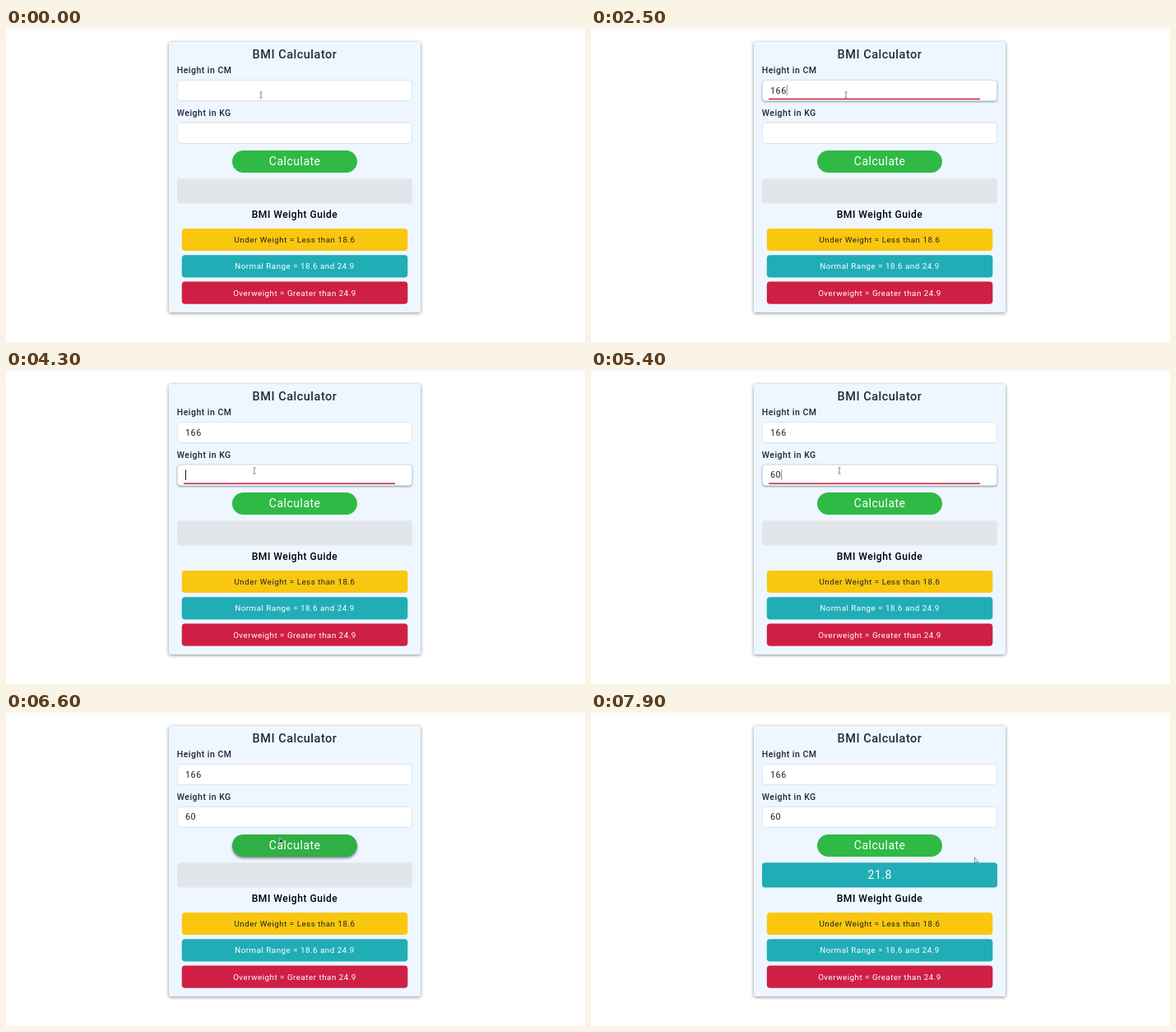
These frames come from a looping animation (704x382 px, 8000 ms). An HTML page:

```html
<!DOCTYPE html>
<html lang="en">
<head>
<meta charset="utf-8">
<title>BMI Calculator</title>
<style>
  html, body { margin: 0; width: 100%; height: 100%; overflow: hidden; background: #fff; }
  svg { display: block; width: 704px; height: 382px; }
  text { font: 400 9.8px Roboto, sans-serif; letter-spacing: .5px; fill: #fff; }
  .mid { text-anchor: middle; }
  .label { font-size: 10.5px; font-weight: 500; fill: #20262e; }
  .value { font-size: 10.8px; fill: #222; }
  .big { font-size: 14px; }
  .field { fill: #fff; stroke: #d5dce4; stroke-width: .8; }
  .focus .field { filter: drop-shadow(0 1.5px 1.2px rgba(0, 0, 0, .4)); }
  .line { fill: #cb1d45; visibility: hidden; }
  .focus .line { visibility: visible; }
  #card { fill: #eef6ff; filter: drop-shadow(0 1.5px 2px rgba(0, 0, 0, .45)); }
</style>
</head>
<body>
<svg viewBox="0 0 704 382">
  <defs>
    <linearGradient id="top" x2="0" y2="1">
      <stop stop-color="#fafafa"/><stop offset="1" stop-color="#fff"/>
    </linearGradient>
  </defs>
  <rect width="704" height="9" fill="url(#top)"/>
  <rect id="card" x="198" y="17" width="306" height="329" rx="2"/>
  <text class="mid" x="351" y="36.7" style="font-size:14.5px;font-weight:500;fill:#262c38">BMI Calculator</text>

  <g id="height">
    <text class="label" x="207.7" y="55">Height in CM</text>
    <rect class="field" x="208.4" y="63.4" width="285.2" height="25.2" rx="4"/>
    <rect class="line" x="216" y="85.7" width="257" height="1.5"/>
    <text class="value" x="218" y="79.5"></text>
    <rect class="caret" y="69.5" width="1" height="12.5" fill="#111"/>
  </g>
  <g id="weight">
    <text class="label" x="207.7" y="107">Weight in KG</text>
    <rect class="field" x="208.4" y="115.2" width="285.2" height="25.2" rx="4"/>
    <rect class="line" x="216" y="137.4" width="257" height="1.5"/>
    <text class="value" x="218" y="131.3"></text>
    <rect class="caret" y="121.3" width="1" height="12.5" fill="#111"/>
  </g>

  <rect id="button" x="275" y="149" width="152" height="27" rx="13.5"/>
  <text class="mid big" x="351.2" y="167">Calculate</text>
  <rect id="result" x="208" y="183.3" width="286" height="30.2" rx="3.5"/>
  <text id="bmi" class="mid big" x="351.2" y="203.3"></text>

  <text class="mid" x="351" y="230.7" style="font-size:12.1px;font-weight:500;fill:#000">BMI Weight Guide</text>
  <rect x="213.8" y="244" width="274.6" height="27" rx="4" fill="#f9c70f"/>
  <text class="mid" x="351" y="261" style="fill:#222">Under Weight = Less than 18.6</text>
  <rect x="213.8" y="276.2" width="274.6" height="27.4" rx="4" fill="#21adb6"/>
  <text class="mid" x="351" y="293.4">Normal Range = 18.6 and 24.9</text>
  <rect x="213.8" y="308.6" width="274.6" height="27.2" rx="4" fill="#cf1f45"/>
  <text class="mid" x="351" y="325.8">Overweight = Greater than 24.9</text>

  <g id="mouse">
    <path id="beam" d="M-1.5-3.5H1.5M0-3.5V3.5M-1.5 3.5H1.5" fill="none" stroke="#666" stroke-width=".8"/>
    <path id="arrow" d="M0 0V7L1.7 5.5H4.6Z" stroke-width=".7"/>
  </g>
</svg>
<script>
const LOOP = 8000, STEP = 100, BLINK = 500;
const $ = id => document.getElementById(id);
const ramp = (t, a, b) => Math.min(1, Math.max(0, (t - a) / (b - a)));
const ease = u => u * u * (3 - 2 * u);

const fields = [
  { id: 'height', text: '166', focus: 400, blur: 3100, keys: [1600, 1800, 2000] },
  { id: 'weight', text: '60', focus: 3100, blur: 6500, keys: [4700, 4900] },
];

// time, x, y of the pointer
const path = [
  [0, 310, 81.5], [2700, 310, 81.5], [3000, 302, 122.5], [5600, 302, 122.5],
  [6200, 333, 153], [7200, 333, 153], [7300, 317.5, 163.5], [7800, 466.5, 177], [LOOP, 466.5, 177],
];

function pointer(t) {
  const i = path.findIndex(p => p[0] > t);
  const [t0, x0, y0] = path[i - 1], [t1, x1, y1] = path[i];
  const u = ease(ramp(t, t0, t1));
  return [x0 + (x1 - x0) * u, y0 + (y1 - y0) * u];
}

function drawField({ id, text, focus, blur, keys }, t) {
  const box = $(id), caret = box.querySelector('.caret');
  const active = t >= focus && t < blur;
  const typed = keys.filter(k => t >= k).length;
  const phase = (t - (typed ? keys[typed - 1] : focus)) % (2 * BLINK);
  const value = box.querySelector('.value');
  value.textContent = text.slice(0, typed);
  box.setAttribute('class', active ? 'focus' : '');
  caret.setAttribute('x', 218 + (typed ? value.getComputedTextLength() : 0));
  caret.setAttribute('opacity', !active ? 0 : phase < BLINK ? 1 : phase < BLINK + 200 ? .5 : 0);
}

function draw(now) {
  const t = Math.floor(now % LOOP / STEP) * STEP;
  fields.forEach(f => drawField(f, t));

  const hover = ramp(t, 5800, 6200) - ramp(t, 7600, 7900);
  const button = $('button');
  button.style.fill = `rgb(47, ${186 - 11 * hover}, 69)`;
  button.style.filter = hover ? `drop-shadow(0 ${2 * hover}px 1.8px rgba(0, 0, 0, ${.45 * hover}))` : 'none';

  const done = t >= 6700;
  $('result').style.fill = done ? '#21adb6' : '#e2e6ea';
  $('bmi').textContent = done ? '21.8' : '';

  const [x, y] = pointer(t), beam = y < 141, over = y > 149 && y < 176 && x < 427;
  $('mouse').setAttribute('transform', `translate(${x} ${y})`);
  $('beam').style.display = beam ? '' : 'none';
  $('arrow').style.display = beam ? 'none' : '';
  $('arrow').style.fill = over ? '#111' : '#f4f8fc';
  $('arrow').style.stroke = over ? '#fff' : '#666';
}

const start = performance.now();
(function frame() {
  draw(performance.now() - start);
  requestAnimationFrame(frame);
})();
</script>
</body>
</html>
```
